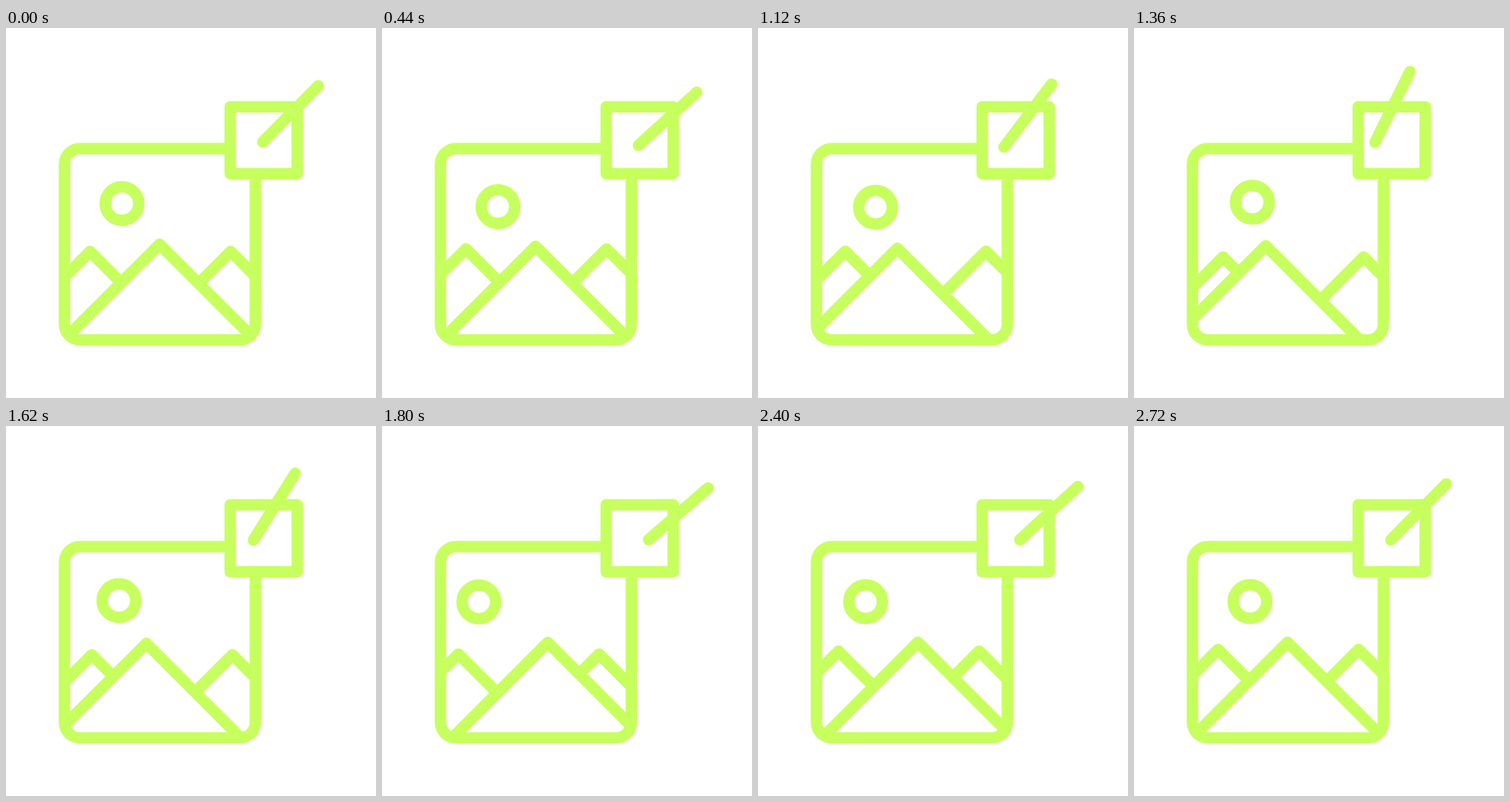
An HTML page that plays this animation: 500 px wide and 500 px high, repeating every 3000 ms.

```html
<!DOCTYPE html>
<html lang="en">
<head>
<meta charset="utf-8">
<title>Picture edit icon</title>
<style>
  html, body { margin: 0; width: 100%; height: 100%; overflow: hidden; background: #fff; }
  svg { display: block; width: 100vw; height: 100vh; }
  .line { fill: none; stroke: #c7ff5e; stroke-width: 15.5; stroke-linecap: round; stroke-linejoin: round; }
  .hill { fill: #fff; }
</style>
</head>
<body>
<svg viewBox="0 0 500 500">
  <defs>
    <clipPath id="inside"><rect x="79" y="163" width="258" height="258.5" rx="21"/></clipPath>
    <path id="slope" class="line hill" d="M-200 200L0 0L200 200"/>
  </defs>
  <g clip-path="url(#inside)">
    <circle id="sun" class="line" cx="156.7" cy="237.2" r="22.7"/>
    <g id="far">
      <use href="#slope" x="113.5" y="302"/>
      <use href="#slope" x="303.5" y="302"/>
    </g>
    <g id="near"><use href="#slope" x="207.5" y="292.3"/></g>
  </g>
  <path class="line" d="M303 163H100a21 21 0 0 0-21 21V400.5a21 21 0 0 0 21 21H316a21 21 0 0 0 21-21V197"/>
  <rect class="line" x="303" y="106.5" width="90.5" height="90.5"/>
  <g id="pen"><path class="line" transform="translate(347 154)" d="M0 0H106.5"/></g>
</svg>
<script>
const LOOP = 3000;
const PEN_ANGLE = -45.3;
const el = id => document.getElementById(id);
const pen = el("pen").firstElementChild;

// Shifts from the resting picture; pen also turns by "turn" degrees
const rest = { sun: [0, 0], far: [0, 0], near: [0, 0], pen: [0, 0], turn: 0 };
const low = { sun: [0, 18], far: [0, -15], near: [0, 11.7], pen: [-2, 19], turn: 13 };
const left = { sun: [3.2, -1.8], far: [6.7, 7.5], near: [-29.5, 2], pen: [-21.3, 0.4], turn: -18.4 };
const right = { sun: [-29.7, 0.8], far: [-12.5, 6], near: [22.7, 0], pen: [18, -0.5], turn: 7.3 };

const moves = [
  { from: rest, to: low, start: 200, time: 620 },
  { from: low, to: left, start: 820, time: 540 },
  { from: left, to: right, start: 1400, time: 580 },
  { from: right, to: rest, start: 2020, time: 700 }
];

const ease = p => p < 0.5 ? 4 * p ** 3 : 1 - 4 * (1 - p) ** 3;
const mix = (a, b, k) => a + (b - a) * k;

function draw(t) {
  const { from, to, start, time } = moves.findLast(m => t >= m.start) || moves[0];
  const k = ease(Math.min(1, Math.max(0, (t - start) / time)));
  for (const id of ["sun", "far", "near", "pen"]) {
    const [x, y] = from[id].map((v, i) => mix(v, to[id][i], k));
    el(id).setAttribute("transform", `translate(${x} ${y})`);
  }
  const angle = PEN_ANGLE + mix(from.turn, to.turn, k);
  pen.setAttribute("transform", `translate(347 154) rotate(${angle})`);
}

const begin = performance.now();
function tick() {
  draw((performance.now() - begin) % LOOP);
  requestAnimationFrame(tick);
}
tick();
</script>
</body>
</html>
```
